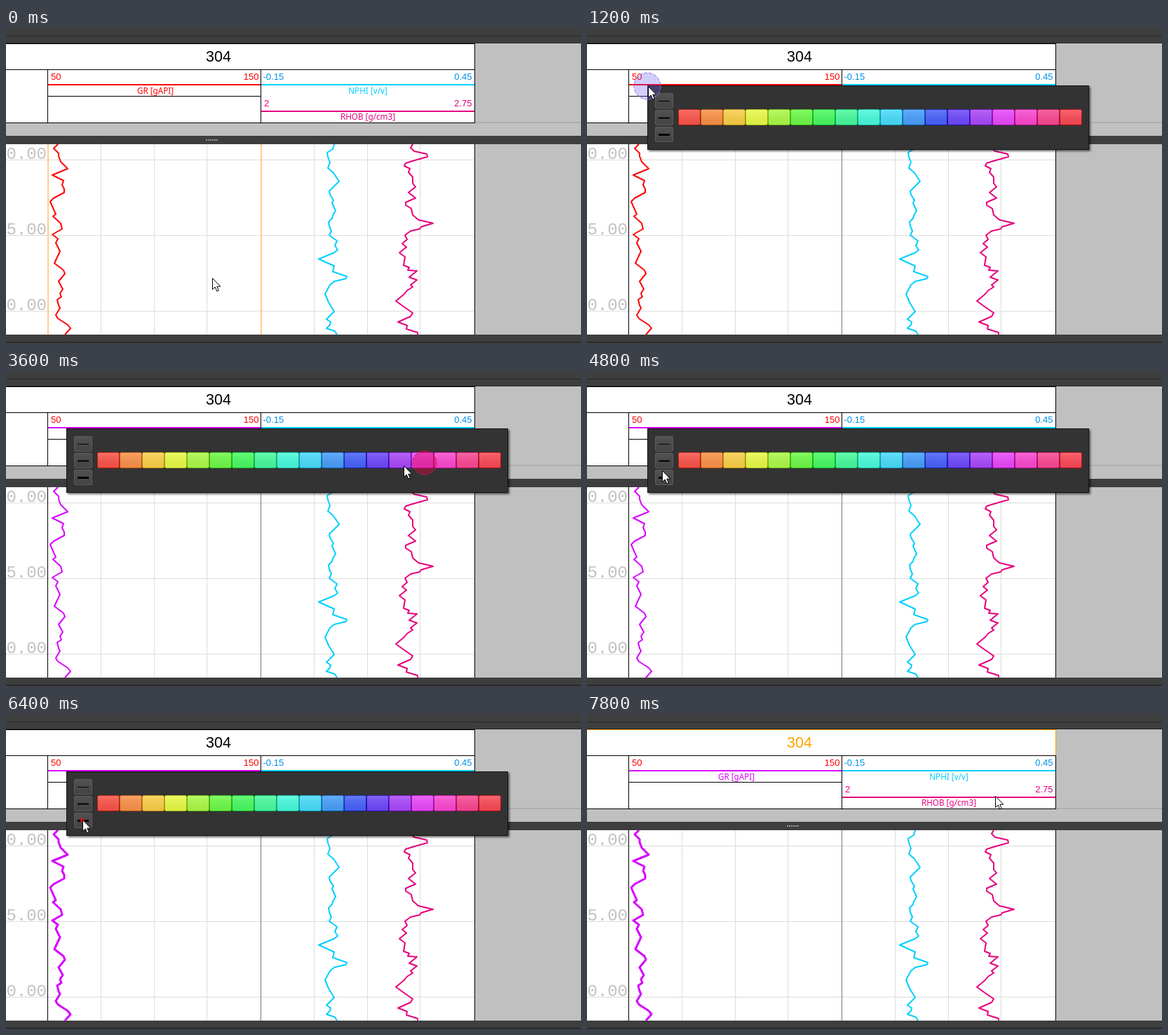
Animation, 820 px wide and 450 px high, one loop 8000 ms. Source, as an HTML page:

```html
<!DOCTYPE html>
<html lang="en">
<head>
<meta charset="utf-8">
<title>Log curve styling</title>
<style>
  html, body { margin: 0; width: 100%; height: 100%; overflow: hidden; background: #c0c0c0; }
  svg { display: block; width: 820px; height: 450px; --gr: #f00; --title: #000; }
  .crisp { shape-rendering: crispEdges; }
  .num { font: 13px "Liberation Sans", Arial, sans-serif; }
  .name { font: 11.7px "Noto Sans", sans-serif; text-anchor: middle; }
  .title { font: 21.5px "Liberation Sans", Arial, sans-serif; text-anchor: middle; fill: var(--title); }
  .depth { font: 24px "Liberation Mono", monospace; text-anchor: end; fill: #c2c2c2; }
  .end { text-anchor: end; }
  .curve { fill: none; stroke-width: 2; stroke-linejoin: round; }
  .red { fill: #f00; }
  .blue { fill: #0091ea; }
  .cyan { fill: #00cfff; }
  .pink { fill: #e6007e; }
  .grVar { fill: var(--gr); }
  #gr { stroke: var(--gr); }
  #popup { filter: drop-shadow(2px 2px 1.5px rgba(0, 0, 0, .6)); }
</style>
</head>
<body>
<svg viewBox="0 0 820 450">
  <defs>
    <linearGradient id="key" x2="0" y2="1">
      <stop stop-color="#525252"/><stop offset="1" stop-color="#434343"/>
    </linearGradient>
    <linearGradient id="gloss" x2="0" y2="1">
      <stop stop-color="#fff" stop-opacity=".16"/><stop offset="1" stop-color="#000" stop-opacity=".06"/>
    </linearGradient>
  </defs>

  <g class="crisp">
    <rect width="820" height="450" fill="#c0c0c0"/>
    <rect y="22" width="668" height="114" fill="#fff"/>
    <rect y="166" width="668" height="272" fill="#fff"/>
    <rect x="669" y="134" width="151" height="2" fill="#adadad"/>
    <path id="grid" stroke="#dcdcdc" fill="none"/>
  </g>

  <g class="depth">
    <text x="58" y="187">0.00</text>
    <text x="58" y="295">5.00</text>
    <text x="58" y="403">0.00</text>
  </g>

  <g class="crisp">
    <rect id="line364" x="363" y="166" height="272"/>
    <rect id="line60" x="59" y="166" height="272"/>
    <rect id="line668" x="668" y="166" width="1" height="272"/>
  </g>

  <polyline id="gr" class="curve" points="74,166 68,172 75,179 75,183 78,191 88,201 66,210 82,218 80,224 83,230 83,235 68,243 63,248 71,266 67,269 78,279 80,287 66,295 74,301 71,307 77,319 69,336 82,346 84,351 75,362 81,373 77,379 79,384 73,388 75,396 77,400 71,410 74,415 88,424 92,429 84,438"/>
  <polyline class="curve" stroke="#00cfff" points="468,166 466,173 458,178 459,184 462,192 459,200 467,207 475,219 461,233 462,238 467,246 465,250 470,261 466,268 465,272 460,277 461,283 464,290 461,296 472,304 469,311 473,317 468,321 446,330 468,340 466,348 486,355 485,358 468,362 462,367 455,380 460,392 468,405 457,416 463,420 462,424 457,429 469,433 472,438"/>
  <polyline class="curve" stroke="#e6007e" points="580,166 577,171 582,176 600,180 601,184 583,189 570,193 568,197 576,201 574,206 580,213 580,222 584,227 574,235 584,243 570,249 570,253 578,258 580,267 588,274 609,279 592,284 590,287 577,290 569,296 572,302 565,308 571,313 561,321 569,327 567,339 575,342 573,346 586,347 575,356 586,360 577,367 580,370 572,375 568,380 556,390 567,398 580,407 577,412 559,420 572,425 571,430 587,435 587,438"/>

  <g class="crisp">
    <path d="M0 59.5H668.5V135.5H0M59.5 60V135M363.5 60V135M60 97.5H363" fill="none" stroke="#000"/>
    <path d="M0 22.5H668.5V59" fill="none" stroke="var(--title)"/>
    <rect class="grVar" x="60" y="80" width="303" height="2"/>
    <rect class="cyan" x="364" y="80" width="304" height="2"/>
    <rect class="pink" x="364" y="118" width="304" height="2"/>
    <rect width="820" height="22" fill="#3e3e3e"/>
    <rect y="11" width="820" height="1" fill="#292929"/>
    <rect y="21" width="820" height="1" fill="#292929"/>
    <rect y="154" width="820" height="12" fill="#3e3e3e"/>
    <rect y="438" width="820" height="12" fill="#3e3e3e"/>
    <rect y="448" width="820" height="2" fill="#292929"/>
    <path d="M285 160H302" stroke="#999" stroke-width="2" stroke-dasharray="2 1"/>
  </g>

  <text class="title" x="303" y="48">304</text>
  <g class="num">
    <text class="red" x="64" y="74">50</text>
    <text class="red end" x="360.5" y="74">150</text>
    <text class="blue" x="366.5" y="74">-0.15</text>
    <text class="blue end" x="664.5" y="74">0.45</text>
    <text class="pink" x="368" y="112">2</text>
    <text class="pink end" x="664.5" y="112">2.75</text>
  </g>
  <g class="name">
    <text class="grVar" x="213" y="94">GR [gAPI]</text>
    <text class="cyan" x="516" y="94">NPHI [v/v]</text>
    <text class="pink" x="516" y="131">RHOB [g/cm3]</text>
  </g>

  <g id="popup">
    <rect x="86.5" y="82.5" width="629" height="91" fill="#333" stroke="#151515"/>
  </g>
  <circle id="ring"/>
  <path id="cursor" d="M.5 .5V16.5L4.2 13L6.8 19L9.3 18L6.8 12.2H11.8Z" fill="#fff" stroke="#000"/>
</svg>

<script>
const TICK = 200, TICKS = 40, ORANGE = '#ffa500';
const $ = id => document.getElementById(id);
const svg = document.querySelector('svg');

const set = (node, attrs) => {
  for (const name in attrs) node.setAttribute(name, attrs[name]);
};
const add = (parent, tag, attrs) => {
  const node = document.createElementNS('http://www.w3.org/2000/svg', tag);
  set(node, attrs);
  parent.append(node);
};

const columns = [135, 211, 286, 439, 515, 590].map(x => `M${x}.5 166V438`);
const rows = [188, 296, 404].map(y => `M0 ${y}.5H668`);
set($('grid'), { d: columns.concat(rows).join('') });

for (let i = 0; i < 3; i++) {
  const y = 93.5 + 24 * i;
  add($('popup'), 'rect', { x: 97.5, y, width: 25, height: 21, rx: 1.5, fill: 'url(#key)', stroke: '#5c5c5c' });
  add($('popup'), 'rect', { x: 102, y: y + 10.5 - i / 2, width: 16, height: i + 1 });
}
for (let i = 0; i < 18; i++) {
  const hue = i * 20.7 + 4;
  const box = { x: 130.5 + 32 * i, y: 116.5, width: 31, height: 22, rx: 2 };
  add($('popup'), 'rect', { ...box, fill: `hsl(${hue} 98% 64%)`, stroke: `hsl(${hue} 90% 38%)` });
  add($('popup'), 'rect', { ...box, fill: 'url(#gloss)' });
}

// tick, x, y of the pointer
const path = [
  [0, 294, 357], [4, 130, 115], [5, 87, 83], [7, 87, 83], [9, 503, 135], [11, 464, 127],
  [12, 464, 127], [15, 656, 130], [16, 656, 130], [17, 597, 130], [18, 567, 135],
  [20, 39, 150], [22, 105, 145], [25, 108, 140], [27, 109, 109], [29, 109, 109],
  [31, 109, 151], [33, 109, 151], [34, 232, 175], [35, 673, 260], [36, 673, 260], [39, 582, 117]
];
const clicks = [
  { at: 5, x: 86, y: 83, radii: [3, 19], fill: 'rgba(110,90,245,.3)', stroke: '#8c7be8' },
  ...[[11, 465, 128], [17, 597, 131], [28, 109, 109], [32, 109, 152]].map(([at, x, y]) =>
    ({ at, x, y, radii: [3, 17, 24], fill: 'rgba(225,0,60,.4)', stroke: '#c01850' }))
];

function pointerAt(tick) {
  const next = path.findIndex(key => key[0] >= tick);
  const [t1, x1, y1] = path[next];
  const [t0, x0, y0] = path[Math.max(0, next - 1)];
  const k = t1 > t0 ? (tick - t0) / (t1 - t0) : 0;
  return [Math.round(x0 + (x1 - x0) * k), Math.round(y0 + (y1 - y0) * k)];
}

function drawRing(tick) {
  const click = clicks.find(c => tick >= c.at && tick < c.at + c.radii.length);
  if (!click) return set($('ring'), { r: 0 });
  const age = tick - click.at;
  set($('ring'), {
    cx: click.x, cy: click.y, r: click.radii[age],
    fill: age ? click.fill : '#e0101c',
    stroke: age ? click.stroke : 'none',
    'stroke-dasharray': '5 2',
    opacity: age > 1 ? .5 : 1
  });
}

function draw(tick) {
  const [x, y] = pointerAt(tick);
  const open = tick >= 6 && tick <= 36;
  const inBody = !open && y > 166 && y < 438;
  const overGr = inBody && x > 60 && x < 364;
  const overDensity = inBody && x >= 364 && x < 668;
  const inHeader = !open && y > 22 && y < 136 && x < 668;

  svg.style.setProperty('--gr', tick < 11 ? '#f00' : tick < 17 ? '#0a80ff' : '#d800ff');
  svg.style.setProperty('--title', inHeader ? ORANGE : '#000');
  $('gr').style.strokeWidth = tick < 28 ? 2 : tick < 32 ? 1 : 3;
  $('popup').style.display = open ? '' : 'none';

  const edge = (id, lit, plain) => set($(id), { fill: lit ? '#ffcf80' : plain });
  edge('line60', overGr, '#000');
  edge('line364', overGr || overDensity, '#777');
  edge('line668', overDensity, '#000');
  set($('line60'), { width: overGr ? 2 : 1 });
  set($('line364'), { width: overGr || overDensity ? 2 : 1 });

  drawRing(tick);
  set($('cursor'), { transform: `translate(${x} ${y})` });
}

const start = performance.now();
function loop() {
  draw(Math.floor((performance.now() - start) / TICK) % TICKS);
  requestAnimationFrame(loop);
}
loop();
</script>
</body>
</html>
```
